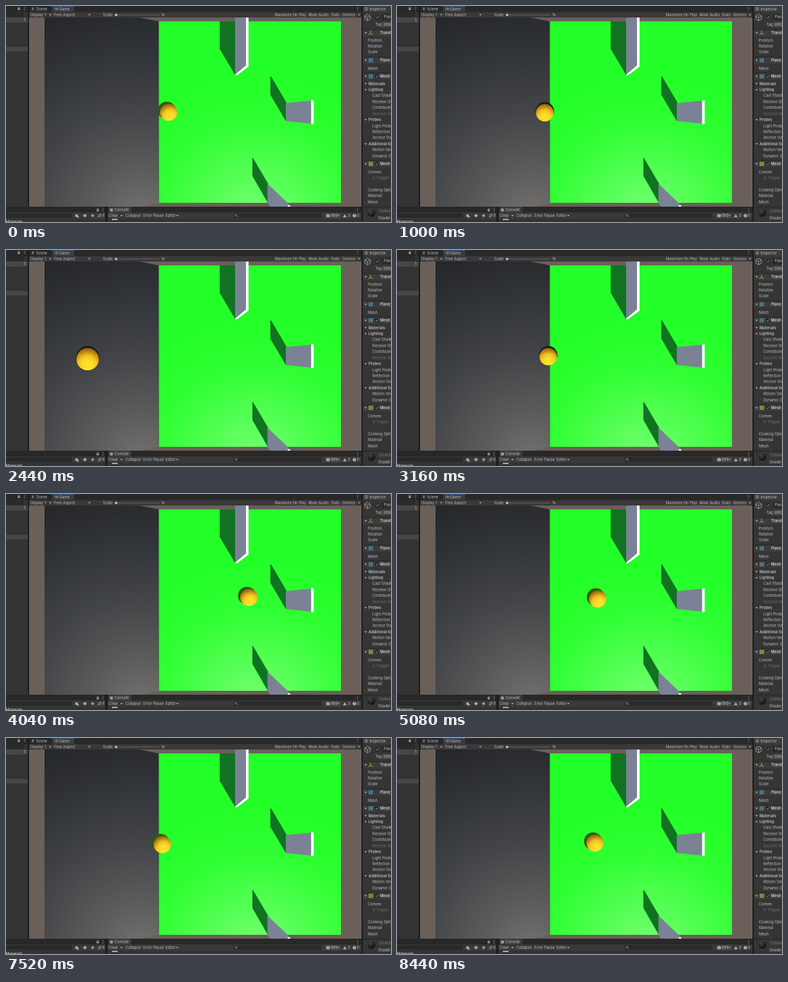
These frames come from a looping animation (600 px wide and 338 px high, 8480 ms). An HTML page with a canvas:

```html
<!DOCTYPE html>
<html>
<head>
<meta charset="utf-8">
<style>
html, body { margin: 0; height: 100%; overflow: hidden; background: #333; }
canvas { display: block; width: 600px; height: 338px; }
</style>
</head>
<body>
<canvas id="stage" width="600" height="338"></canvas>
<script>
const c = document.getElementById('stage').getContext('2d');
const LOOP = 8480, STEP = 40, ROW = 9.42;
const INK = '#bdbdbd', ICON = '#a8a8a8', DIM = '#6c6c6c', DARK = '#282828', EDGE = '#1b1b1b';

function box(x, y, w, h, color) {
  c.fillStyle = color;
  c.fillRect(x, y, w, h);
}
function trace(p) {
  c.beginPath();
  for (let i = 0; i < p.length; i += 2) c.lineTo(p[i], p[i + 1]);
}
function poly(color, ...p) {
  c.fillStyle = color;
  trace(p);
  c.fill();
}
function line(color, width, ...p) {
  c.strokeStyle = color;
  c.lineWidth = width;
  trace(p);
  c.stroke();
}
function disc(x, y, r, color) {
  c.fillStyle = color;
  c.beginPath();
  c.arc(x, y, r, 0, 7);
  c.fill();
}
function ring(x, y, r) {
  c.strokeStyle = ICON;
  c.lineWidth = .7;
  c.beginPath();
  c.arc(x, y, r, 0, 7);
  c.stroke();
}
function text(s, x, y, color = INK, weight = 400) {
  c.font = `${weight} 5.8px Inter, Roboto, sans-serif`;
  c.textBaseline = 'middle';
  c.fillStyle = color;
  c.fillText(s, x, y + .3);
}
function radial(x, y, r, ...colors) {
  const g = c.createRadialGradient(x, y, 0, x, y, r);
  colors.forEach((k, i) => g.addColorStop(i / (colors.length - 1), k));
  return g;
}
// points around a centre, radii alternating between r and q
function star(x, y, n, r, q = r) {
  return Array.from({ length: n }, (_, i) => {
    const a = i * 2 * Math.PI / n, d = i % 2 ? q : r;
    return [x + d * Math.sin(a), y - d * Math.cos(a)];
  }).flat();
}
const down = (x, y) => poly(ICON, x - 2, y - 1, x + 2, y - 1, x, y + 1.5);
function menu(s, x, y, arrow) {
  text(s, x, y);
  down(arrow, y);
}
function dots(x, y) {
  for (let d = -2; d < 3; d += 2) box(x - .5, y + d - .5, 1, 1, ICON);
}
function lock(x, y) {
  ring(x, y - 1, 1.3);
  box(x - 1.7, y, 3.4, 2.2, ICON);
}
function check(x, y) {
  box(x - 2.7, y - 2.7, 5.4, 5.4, '#222');
  line('#ccc', .8, x - 1.7, y, x - .4, y + 1.5, x + 2, y - 1.6);
}
function grid(x, y, color) {
  for (let i = 0; i < 9; i++) box(x - 3.2 + i % 3 * 2.3, y - 3.2 + (i / 3 | 0) * 2.3, 1.8, 1.8, color);
}
function count(x, s) {
  disc(x, 328, 2.6, '#c4c4c4');
  box(x - .4, 326.3, .9, 3.2, '#444');
  text(s, x + 4, 328);
}

function scene() {
  box(36, 18, 518, 296, '#6a6059');
  poly(radial(212, 335, 340, '#757371', '#5a5a5a', '#434548', '#32353a', '#26282b'),
    60, 18, 208, 18, 238, 24, 238, 308, 208, 314, 60, 314);
  box(238, 24, 284, 284, radial(390, 340, 235, '#7cff78', '#55ff55', '#30ff33', '#23ff28'));
  line('#3a5a34', .8, 238, 24, 238, 308);

  const shade = '#117322', face = '#7b8295', top = '#fff';
  poly(shade, 333, 24, 357, 24, 357, 108, 333, 67);
  poly(top, 357, 18, 378, 18, 378, 95, 359, 109, 357, 108);
  poly(face, 357, 18, 374, 18, 374, 93, 357, 107.5);
  poly(shade, 412, 110, 413, 110, 437, 151, 436, 180, 412, 139);
  poly(face, 436, 152, 476, 148, 476, 184, 436, 180);
  box(475.5, 147.5, 4, 37, top);
  poly(shade, 384, 238, 385, 238, 409, 279, 408, 308, 384, 266);
  poly(face, 407.5, 278, 443, 312, 443, 314, 412, 314, 407.5, 308);
  box(439, 312, 4, 2, top);
}

function topBar() {
  box(0, 0, 600, 10, DARK);
  box(72, 0, 34, 10, '#3c3c3c');
  box(72, 0, 34, 1, '#2f5f94');
  box(36, 9.5, 518, 8.5, '#393939');
  text('#', 40, 4.5);
  text('Scene', 47, 4.5);
  ring(77.5, 4.5, 1.5);
  ring(80, 4.5, 1.5);
  text('Game', 83, 4.5);
  dots(548, 4);
  const y = 13.8;
  menu('Display 1', 38, y, 69);
  menu('Free Aspect', 75, y, 130);
  text('Scale', 151, y);
  line('#666', 1, 171, 14, 239, 14);
  disc(171.5, 14, 2.1, INK);
  text('1x', 242, y);
  text('Maximize On Play', 419, y);
  text('Mute Audio', 471.5, y);
  text('Stats', 506, y);
  menu('Gizmos', 524, y, 550);
}

function leftPanel() {
  box(0, 9.5, 34, 304.5, '#333');
  box(0, 10, 28, 7, '#2a2a2a');
  box(0, 18, 34, 8, '#464646');
  box(0, 64, 34, 7, '#464646');
  text('1', 28, 21.5);
  lock(20, 4);
  dots(29, 4);
  box(34, 0, 2, 314, EDGE);
}

function bottom() {
  box(0, 314, 556, 24, '#333');
  box(0, 314, 556, 9, DARK);
  box(160, 314, 35, 9, '#3c3c3c');
  box(0, 323, 556, 10, '#393939');
  box(0, 324.5, 103, 7, '#292929');
  box(155, 314, 3, 24, EDGE);
  lock(143, 319);
  dots(151, 319);
  dots(548, 319);

  const y = 328;
  box(108, y - 2, 4, 4, ICON);
  disc(112, y + 2, 1.5, ICON);
  poly(ICON, ...star(123, y, 4, 3));
  poly(ICON, ...star(135, y, 10, 3.2, 1.4));
  ring(146, y, 2);
  line(ICON, .8, 143, y + 3, 149, y - 3);
  text('8', 150, y);
  text('Materials', 0, 337.5, INK, 600);

  box(162, 317, 4.5, 4.5, '#999');
  text('Console', 169, 319);
  menu('Clear', 160, y, 180);
  text('Collapse', 186, y);
  text('Error Pause', 214, y);
  menu('Editor', 248.5, y, 267);
  box(355, 324.5, 136, 7, '#2a2a2a');
  ring(358.5, 327.5, 1.4);
  line(ICON, .7, 359.5, 328.5, 361, 330);
  box(497, 324, 24, 8, '#464646');
  count(502, '999+');
  poly(ICON, ...star(528, y + 1, 3, 3.4));
  text('0', 533, y);
  count(543, '0');
  box(165, 333.3, 9, 1.4, '#ddd');
}

// '#' marks a bold foldout, '>' an indented row, '~' a disabled one
function list(y, rows) {
  rows.split('|').forEach((row, i) => {
    const mark = '#>~'.indexOf(row[0]), ry = y + i * ROW + .6;
    if (mark < 0) return text(row, 564, ry);
    if (mark == 0) down(560.5, ry);
    text(row.slice(1), mark ? 571 : 565, ry, mark == 2 ? DIM : INK, mark ? 400 : 600);
  });
}
function header(y, name, ticked) {
  box(556, y - 5, 44, 10, '#3c3c3c');
  box(556, y - 5.5, 44, .8, '#222');
  down(560.5, y);
  if (ticked) check(578, y);
  text(name, 583, y, '#d0d0d0', 600);
}

function inspector() {
  box(554, 0, 2, 338, EDGE);
  box(556, 10, 44, 328, '#353535');
  box(556, 0, 44, 10, '#3c3c3c');
  ring(561.5, 4.5, 2.4);
  box(561, 3.2, 1, 3, ICON);
  text('Inspector', 566.5, 4.5);

  const cube = star(563.5, 18, 6, 5);
  line(ICON, .9, ...cube, cube[0], cube[1]);
  for (let i = 2; i < 12; i += 4) line(ICON, .9, 563.5, 18, cube[i], cube[i + 1]);
  check(578.5, 17.5);
  box(586, 13, 14, 8.5, DARK);
  text('Plane', 588.5, 17.3);
  text('Tag', 575.5, 29);
  box(586, 25, 14, 8, '#494949');
  text('Untagged', 588.5, 29);

  header(42, 'Transform');
  line('#c9a03c', 1, 568, 38.5, 568, 43, 572, 45);
  line('#79b84e', 1, 568, 43, 564.5, 45);
  list(53, 'Position|Rotation|Scale');
  header(85, 'Plane');
  grid(568.5, 85, '#4f93b5');
  list(97, 'Mesh');
  header(110, 'Mesh', true);
  grid(568.5, 110, '#5a8faa');
  list(121, '#Materials|#Lighting|>Cast Shadows|>Receive Shadows|>Contribute|~Receive Shadows|' +
    '#Probes|>Light Probes|>Reflection|>Anchor Override|#Additional Settings|>Motion Vectors|>Dynamic Occlusion');
  header(247, 'Mesh', true);
  grid(568.5, 247, '#a5bd35');
  list(259, 'Convex|~Is Trigger||Cooking Options|Material|Mesh');
  box(556, 314, 44, .8, '#222');
  disc(569.5, 324, 6, radial(567.5, 321, 8, '#444', '#151515'));
  text('Contrast', 581, 321, '#858585');
  text('Shader', 580, 331.5);
}

// turning points as [ms, x]; the ball swings between them on half cosines
const turns = [[0, 252], [680, 252], [1920, 113], [2110, 113], [4390, 393], [5810, 222], [5960, 93], [8440, 307], [LOOP, 307]];

function ballX(t) {
  const i = turns.findIndex(k => k[0] > t);
  const [ta, a] = turns[i - 1], [tb, b] = turns[i];
  return a + (b - a) * (1 - Math.cos(Math.PI * (t - ta) / (tb - ta))) / 2;
}

function ball(x) {
  const y = 164.7 - .036 * (x - 252), r = 14.8 + Math.max(0, 238 - x) * .036;
  const flat = x > 242, side = flat ? 1.4 : 0;
  const lx = x + side, ly = y + 1.6, lr = r - 1.3;
  disc(x - side, y - 1, r - .8, flat ? '#2c5a10' : '#1d1a10');
  disc(lx, ly, lr, radial(lx + side * 2, ly + r * .5, r * 1.6, '#ffe930', '#ffe02a', '#f3c420', '#b57d14', '#5c4210'));
  const spin = x % 3;
  for (let j = -12; j <= 12; j += 3)
    for (let i = -15; i <= 15; i += 3) {
      const dx = i + spin + (j & 1) * 1.5;
      if (Math.hypot(dx, j) < lr - 1.5) box(lx + dx, ly + j, 1, 1, 'rgba(150,90,0,.25)');
    }
}

function frame(now) {
  const t = Math.floor(now % LOOP / STEP) * STEP;
  scene();
  if (t < 5840 || t >= 7200) ball(ballX(t));
  topBar();
  leftPanel();
  bottom();
  inspector();
  requestAnimationFrame(frame);
}
requestAnimationFrame(frame);
</script>
</body>
</html>
```
